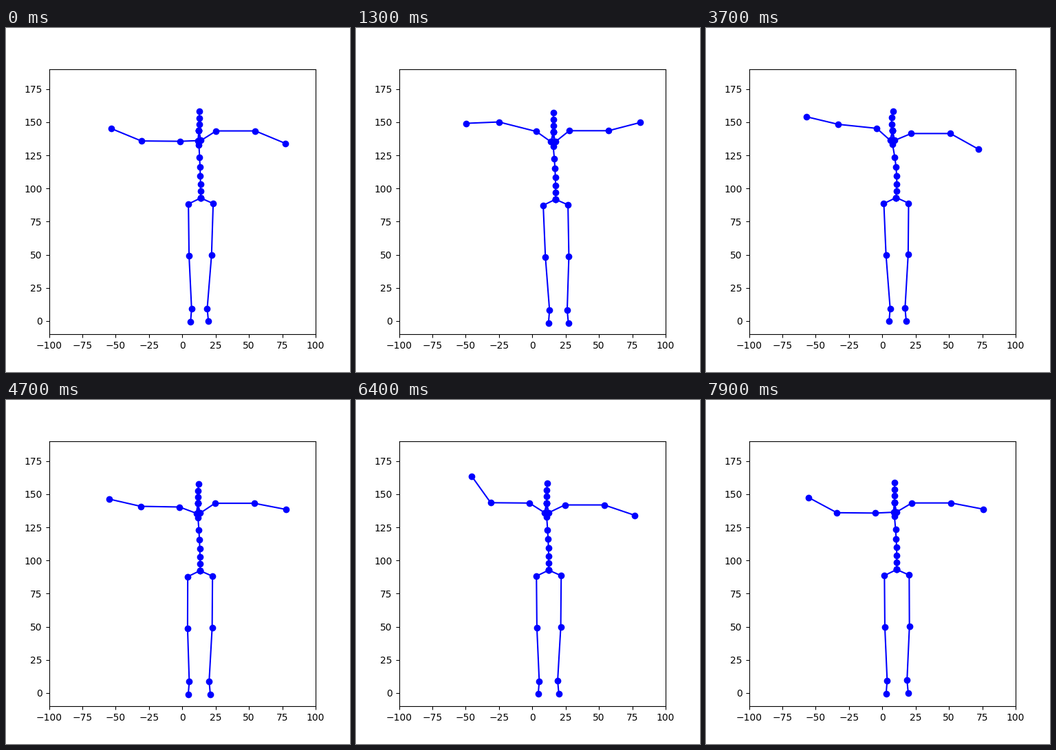
These frames come from a looping animation (500x500 px, 8000 ms). A matplotlib script:

```python
import numpy as np
import matplotlib.pyplot as plt
from matplotlib.animation import FuncAnimation

FRAMES, INTERVAL = 80, 100

# hip x, hip y, spine lean, left collar / arm / forearm lift,
# right collar / forearm lift, left and right leg swing (cm, degrees)
CALM = np.array([13.3, 92.8, -3, -2, 0.5, 22.5, 32.5, -22.7, 1.7, -3.2])
RAISE = np.array([12.7, 92.7, -4, 32.5, 0.5, 54.6, 25.6, -18.8, 1.5, -1.9])
LEAN = np.array([10.2, 93.1, -10, 42, 6, 13.5, 22.6, -29.3, 3.4, -1.9])
PASS = np.array([17.5, 91.8, -5, 35.5, 14.3, -2.4, 38.7, 14.6, 3.4, -0.4])
SETTLE = np.array([12.8, 92.3, -4, 20.5, 1, 13, 33.7, -11, 0.8, -1.8])
RELAX = np.array([10.8, 93.2, -5, -4, 0.5, 29.3, 30.6, -11, 1.5, -1.1])

# Each arm wave runs through the same poses from its own start
WAVE = [(-5, CALM), (0, RAISE), (2, LEAN), (6, PASS), (12, SETTLE)]
KEYS = [(0, CALM)]
for start, end in [(7, CALM), (35, CALM), (64, RELAX)]:
    KEYS += [(start + dt, p) for dt, p in WAVE] + [(start + 15.5, end)]

SPINE = np.array([5.2, 5.2, 6.2, 6.7, 7.2, 9.8])
NECK = np.full(3, 4.9)
LEG = [10.25, 38.9, 40.4, 9.85]


def blend(t):
    """Ease from the last key pose to the next one."""
    for (t0, a), (t1, b) in zip(KEYS, KEYS[1:]):
        if t <= t1:
            break
    u = np.clip((t - t0) / (t1 - t0), 0, 1)
    return a + (b - a) * u * u * (3 - 2 * u)


def walk(start, lengths, angles):
    """Joints of a bone chain; angles in degrees from the x axis."""
    a = np.radians(angles)
    steps = np.column_stack([np.cos(a), np.sin(a)]) * np.asarray(lengths)[:, None]
    return np.vstack([start, start + np.cumsum(steps, axis=0)])


def skeleton(t):
    x, y, lean, collar_l, arm_l, fore_l, collar_r, fore_r, leg_l, leg_r = blend(t)
    drift = 0.5 * np.cos(2 * np.pi * t / 46)
    hips = np.array([x + drift, y])

    # The lower spine counters the lean of the chest, the neck bends back
    low = -0.7 * lean - 2.5
    spine = walk(hips, SPINE, 90 - np.linspace(low, lean, len(SPINE)))
    neck = spine[-1] + [0, 10.5]
    bend = -1.6 * (lean + 4)
    head = walk(neck, NECK, 89 + bend * np.array([1, 0, -1]))

    left = walk(neck, [7.5, 13.45, 29.05, 24.35],
                [264 - 0.2 * collar_l, 180 - collar_l, 180 - arm_l, 180 - fore_l])
    right = walk(neck, [7.5, 13.45, 29.4, 24.35], [282, collar_r, 0, fore_r])

    legs = [walk(hips, LEG, [206, 269 + leg_l, 271 + leg_l, 265.5]),
            walk(hips, LEG, [336, 271.4 + leg_r, 268.6 + leg_r, 275])]
    return [np.vstack([spine, head]), left, right, *legs]


fig, ax = plt.subplots(figsize=(5, 5), dpi=100)
ax.set_xlim(-100, 100)
ax.set_ylim(-10, 190)
chains = [ax.plot([], [], "bo-", lw=1.5, ms=6)[0] for _ in range(5)]


def update(frame):
    for line, joints in zip(chains, skeleton(frame)):
        line.set_data(joints[:, 0], joints[:, 1])
    return chains


anim = FuncAnimation(fig, update, frames=FRAMES, interval=INTERVAL,
                     repeat=True, repeat_delay=0, blit=False)
plt.show()
```
